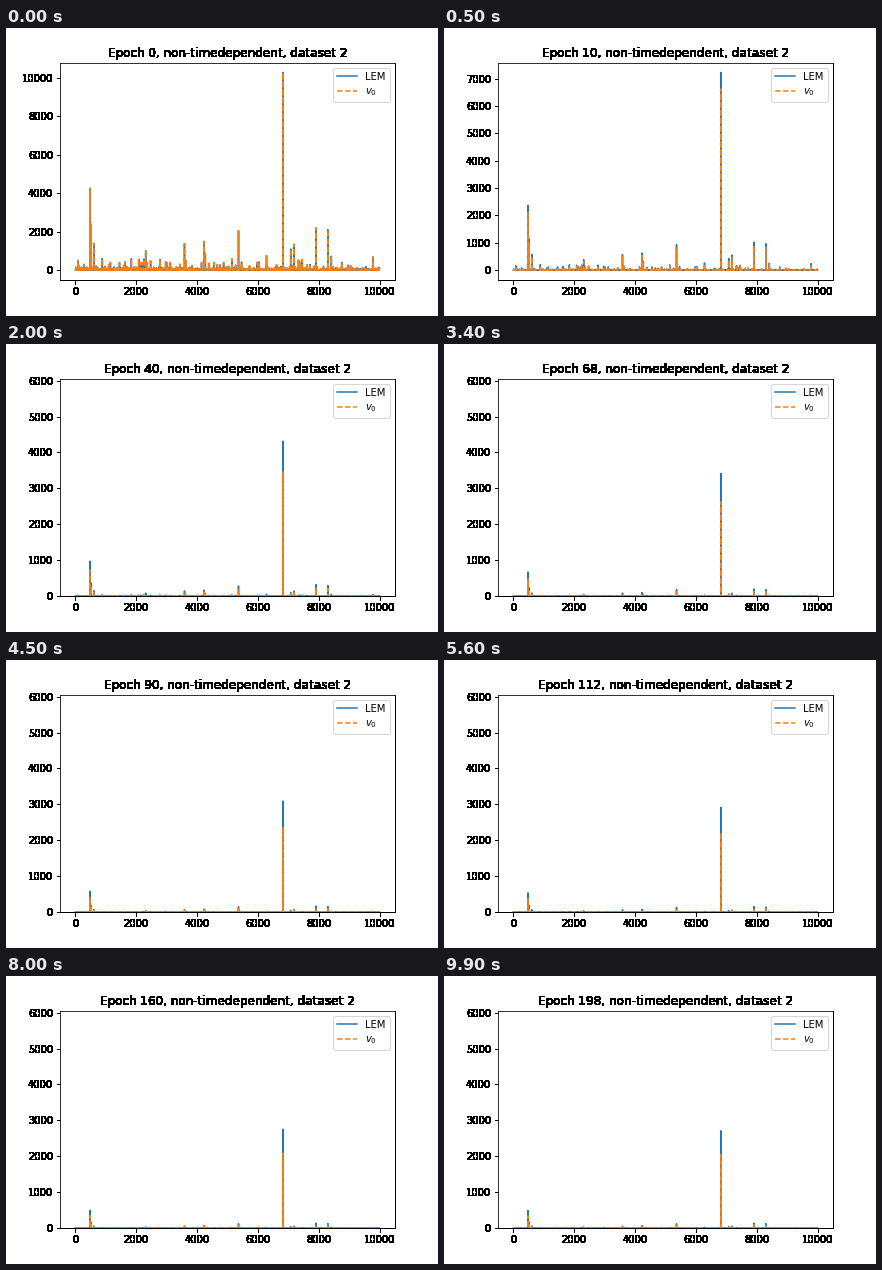
These frames come from a looping animation (432x288 px, 10000 ms). A matplotlib script:

```python
import numpy as np
import matplotlib.pyplot as plt
from matplotlib.animation import FuncAnimation

FRAMES, INTERVAL = 100, 100
EPOCHS_PER_FRAME = 2
LOCK_EPOCH, LOCKED_TOP = 20, 6060
PEAK, FLOOR = 10280, 2675
STEP = 5

# position and starting height of the tallest spikes
SPIKES = {
    486: 4260, 520: 2400, 610: 1400, 3590: 1380, 4230: 1500,
    5365: 2050, 6825: PEAK, 7190: 1350, 7910: 2200, 8300: 2100,
}

plt.rcParams.update({"font.family": "DejaVu Sans", "font.size": 10})


def make_shape():
    """Starting curve scaled to 1: low noise, minor spikes, tall spikes."""
    rng = np.random.default_rng(2)
    x = np.arange(0, 10000, STEP)
    y = np.minimum(22 * np.exp(1.1 * rng.normal(size=x.size)), 400)
    minor = rng.choice(x.size, 24, replace=False)
    y[minor] = np.minimum(400 + rng.exponential(300, minor.size), 1250)
    for pos, height in SPIKES.items():
        y[pos // STEP] = height
    return x, y / PEAK


def curves(epoch):
    """Both curves shrink, and small spikes fade faster than tall ones."""
    top = FLOOR + (PEAK - FLOOR) * np.exp(-(epoch / 23.3) ** 0.79)
    power = 1 + 0.95 * (1 - np.exp(-epoch / 30))
    gap = 1 - np.exp(-epoch / 24)
    lem = top * shape ** power
    v0 = top * (1 - 0.245 * gap) * shape ** (power + 0.1 * gap)
    return top, lem, v0


def harden(img, dpi):
    """Turn every touched pixel solid black, leaving no soft edges."""
    solid_img = np.zeros_like(img)
    solid_img[..., 3] = img[..., 3] > 0
    return solid_img, 0, 0


x, shape = make_shape()

fig = plt.figure(figsize=(6, 4), dpi=72, facecolor="white")
ax = fig.add_axes([0.125, 0.125, 0.775, 0.755])
solid, = ax.plot(x, shape, label="LEM")
dashed, = ax.plot(x, shape, "--", label="$v_0$")
ax.set_xlim(-500, 10500)
ax.legend(loc="upper right")
title = ax.set_title("", fontsize=12)

for artist in (title, ax.xaxis, ax.yaxis):
    artist.set_agg_filter(harden)
for side in ("right", "bottom"):
    ax.spines[side].set_linewidth(1)


def update(frame):
    epoch = frame * EPOCHS_PER_FRAME
    top, lem, v0 = curves(epoch)
    solid.set_ydata(lem)
    dashed.set_ydata(v0)
    if epoch < LOCK_EPOCH:
        ax.set_ylim(-0.05 * top, 1.05 * top)
    else:
        ax.set_ylim(0, LOCKED_TOP)
    title.set_text(f"Epoch {epoch}, non-timedependent, dataset 2")
    return solid, dashed, title


anim = FuncAnimation(fig, update, frames=FRAMES, interval=INTERVAL,
                     repeat=True, repeat_delay=0, blit=False)
plt.show()
```
